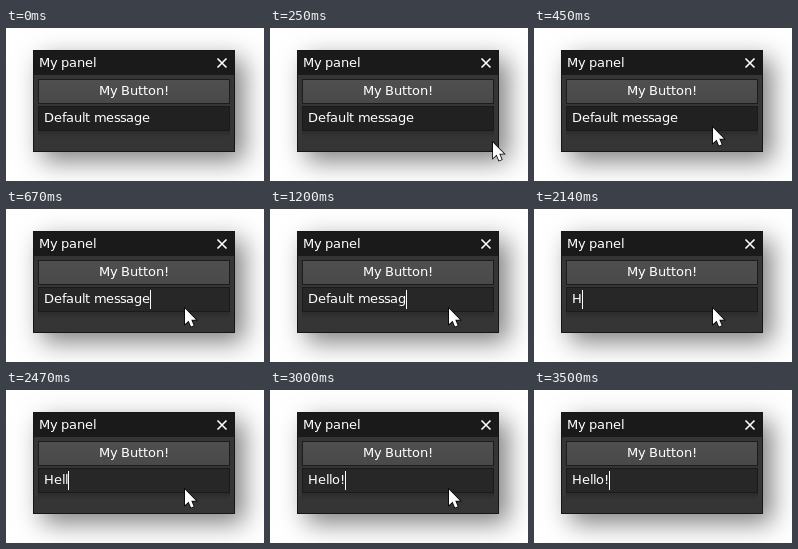
Write an HTML page with a canvas that moves like this. It is 258x153 px and loops after 4160 ms.

```html
<!DOCTYPE html>
<html lang="en">
<head>
<meta charset="utf-8">
<title>Panel</title>
<style>
  html, body { margin: 0; width: 100%; height: 100%; overflow: hidden; background: #fff; }
  canvas { display: block; }
</style>
</head>
<body>
<canvas id="stage" width="258" height="153"></canvas>
<script>
const ctx = document.getElementById('stage').getContext('2d');
const LOOP = 4160;
const FONT = '"DejaVu Sans", sans-serif';
const FOCUS_TIME = 590;

// [time, field text]
const edits = [
  [0, 'Default message'], [1200, 'Default messag'],
  [1470, 'Default messa'], [1540, 'Default mes'], [1610, 'Default m'],
  [1680, 'Default'], [1740, 'Defau'], [1810, 'De'], [1880, ''],
  [2140, 'H'], [2340, 'He'], [2400, 'Hel'], [2470, 'Hell'],
  [2670, 'Hello'], [3000, 'Hello!'],
];

// Whole-pixel advances, as in hinted interface text.
const advances = {};
function advance(char) {
  if (!(char in advances)) {
    ctx.font = `1000px ${FONT}`;
    const width = ctx.measureText(char).width * 0.013;
    advances[char] = /[flmsy]/.test(char) ? Math.floor(width) : Math.round(width);
  }
  return advances[char];
}

function drawText(text, x, baseline) {
  ctx.fillStyle = '#fff';
  for (const char of text) {
    const step = advance(char);
    ctx.font = `13px ${FONT}`;
    ctx.fillText(char, x, baseline);
    x += step;
  }
  return x;
}

function fillBox(x, y, width, height, fill) {
  ctx.fillStyle = fill;
  ctx.fillRect(x, y, width, height);
}

function gradient(top, bottom, from, to) {
  const fill = ctx.createLinearGradient(0, top, 0, bottom);
  fill.addColorStop(0, from);
  fill.addColorStop(1, to);
  return fill;
}

function drawPanel() {
  ctx.save();
  ctx.shadowColor = 'rgba(0,0,0,.5)';
  ctx.shadowBlur = 24;
  ctx.shadowOffsetX = ctx.shadowOffsetY = 9;
  fillBox(27, 22, 202, 102, '#161616');
  ctx.restore();

  fillBox(28, 23, 200, 24, '#1a1a1a');
  fillBox(28, 47, 200, 76, '#353535');
  drawText('My panel', 33, 39);

  ctx.strokeStyle = '#fff';
  ctx.lineWidth = 1.6;
  ctx.beginPath();
  ctx.moveTo(211.5, 30.5);
  ctx.lineTo(220.5, 39.5);
  ctx.moveTo(220.5, 30.5);
  ctx.lineTo(211.5, 39.5);
  ctx.stroke();

  fillBox(32, 51, 192, 25, '#1c1c1c');
  fillBox(33, 52, 190, 23, gradient(52, 75, '#4f4f4f', '#494949'));
  drawText('My Button!', 93, 67);
}

function drawField(time) {
  const focused = time >= FOCUS_TIME;
  fillBox(32, 103, 192, 7, gradient(103, 110, '#2c2c2c', '#353535'));
  fillBox(32, 78, 192, 25, '#1a1a1a');
  fillBox(33, 79, 190, 23, focused ? '#272727' : '#212121');
  const [, text] = edits.findLast(([start]) => time >= start);
  const end = drawText(text, 38, 94);
  if (focused) fillBox(end, 81, 1, 19, '#fff');
}

function pointerAt(time) {
  if (time < 130 || time >= 3500) return null;
  if (time >= 3430) return [201, 101];
  const step = Math.min(1, Math.floor((time - 130) / 64) / 5);
  const left = (1 - step) ** 2;
  return [179 + 69 * left, 99 + 23 * left];
}

function drawPointer(time) {
  const point = pointerAt(time);
  if (!point) return;
  ctx.save();
  ctx.translate(Math.round(point[0]), Math.round(point[1]));
  const arrow = new Path2D('M0 .5V16L3.6 12.7 6 18.5 8.7 17.4 6.3 11.7H11Z');
  ctx.strokeStyle = '#000';
  ctx.lineWidth = 1.5;
  ctx.stroke(arrow);
  ctx.fillStyle = '#fff';
  ctx.fill(arrow);
  ctx.restore();
}

function draw() {
  const time = performance.now() % LOOP;
  fillBox(0, 0, 258, 153, '#fff');
  drawPanel();
  drawField(time);
  drawPointer(time);
  requestAnimationFrame(draw);
}
draw();
</script>
</body>
</html>
```
